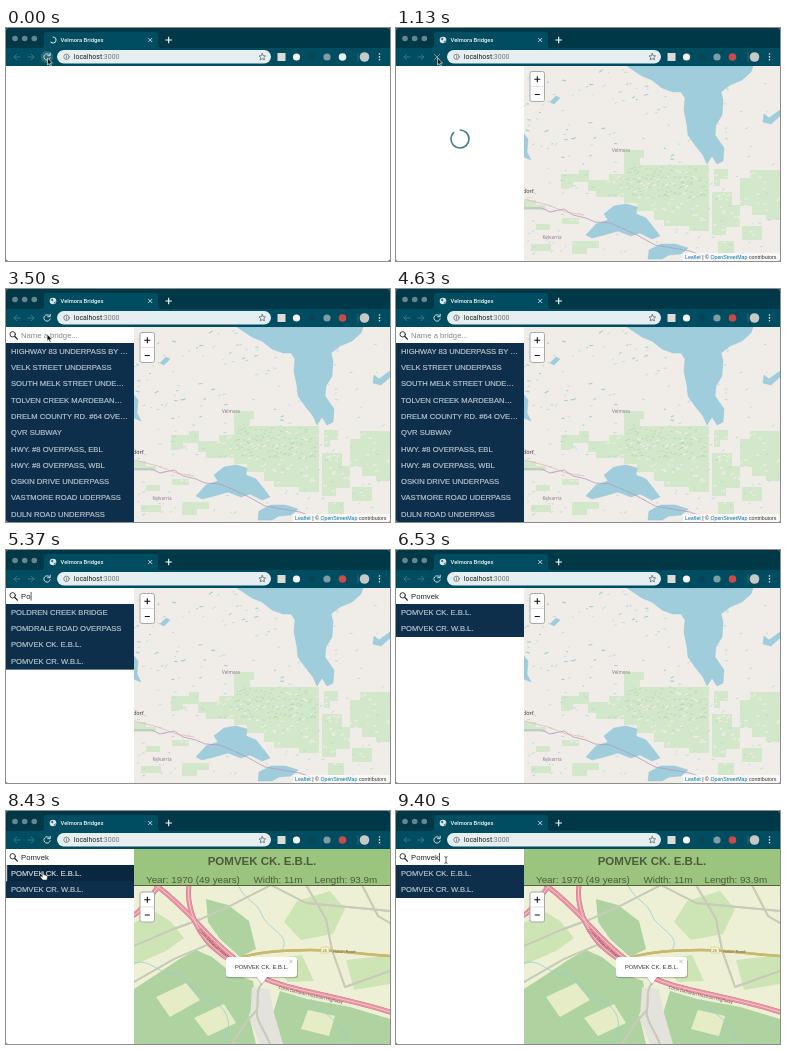
Recreate the animation shown at these times as an HTML page. Size 384 by 233 pixels, loop 9.43 s.

```html
<!DOCTYPE html>
<html lang="en">
<head>
<meta charset="utf-8">
<title>Bridge finder</title>
<style>
  html, body { margin: 0; width: 100%; height: 100%; overflow: hidden; background: #20282c; }
  svg { display: block; width: 100vw; height: 100vh; }
  text { font-family: "Liberation Sans", Arial, sans-serif; white-space: pre; }
  .ui { font-family: Roboto, sans-serif; }
  .map text { font-family: "Noto Sans", sans-serif; }
  .line { fill: none; stroke-linecap: round; stroke-linejoin: round; }
  .water { fill: #9fcddb; stroke: #8bbfd4; stroke-width: .4; }
  .woods { fill: #d3e7cb; }
</style>
</head>
<body>
<svg viewBox="0 0 384 233" preserveAspectRatio="none">
  <defs>
    <clipPath id="window"><rect width="384" height="233" rx="2.5"/></clipPath>
    <clipPath id="mapArea"><rect x="128" y="38" width="256" height="195"/></clipPath>
    <clipPath id="listArea"><rect y="54" width="128" height="179"/></clipPath>
  </defs>
  <g clip-path="url(#window)">
    <rect width="384" height="233" fill="#fff"/>

    <g id="app">
      <g clip-path="url(#mapArea)">
        <rect x="128" y="38" width="256" height="195" fill="#ddd"/>
        <g id="region" class="map">
          <rect x="128" y="38" width="256" height="195" fill="#f0ece7"/>
          <path class="woods" d="M228 122h20v8h-4v7h69v66h-20v-5h-25v-6h-10v-9h-17v-8h-13v-6h-28v-6h-8v-11h21v-6h15zM165 146h18v-4h10v12h-16v7h-12zM128 172h12v5h10v5h-22zM318 141h14v10h-8v7h-6zM344 150h10v-8h30v50h-14v-5h-14v-9h-12zM316 164h20v13h8v22h-14v8h-14zM346 198h20v14h-20zM140 196h14v6h-14zM166 190h17v6h-17zM135 216h20v7h-20zM176 213h27v7h-12v6h-15zM322 213h16v12h-16z"/>
          <path id="forest" class="line" stroke="#b3d5b0" stroke-width=".7"/>
          <path id="paleSpots" class="line" stroke="#f0ece7" stroke-width="1.300"/>
          <path class="water" d="M231 38L237 42L246 48L256 52L266 60L277 64L285 64L289 70L288 82L291 97L292 107L299 117L307 127L311 136L316 128L321 136L327 133L328 120L319 107L320 97L326 87L327 72L325 64L334 57L346 52L355 44L357 38Z"/>
          <path class="water" d="M190 207L200 196L212 192L208 186L218 178L230 176L241 179L240 186L250 190L258 200L264 208L256 211L244 205L235 208L222 203L208 207L196 210ZM253 222l12-6 14 0 13 4-7 6-12 1-7 4h-14zM154 74l6-6 4 2-6 6zM128 106l4 5-1 13 4 8-7-3zM368 86l5 4 11-8v6l-9 8-8-2z"/>
          <path id="lakes" class="line" stroke="#9fcddb" stroke-width="1.100"/>
          <path id="ponds" class="line" stroke="#a9d3df" stroke-width=".7"/>
          <path class="line" d="M128 180L146 180L154 184L168 181L177 187L190 190L199 194L214 195L228 201L241 207L259 217L294 223L320 233" stroke="#b49abf" stroke-width=".8"/>
          <path class="line" d="M128 171L152 177L170 184L188 187M128 160L140 166" stroke="#e3a8ad" stroke-width=".6"/>
          <g font-size="4.600" fill="#8b7b93" text-anchor="middle">
            <text x="225" y="123.500">Velmora</text>
            <text x="156" y="210.500">Kelvarria</text>
          </g>
          <text x="127" y="165" font-size="5.400" fill="#444">dorf</text>
        </g>
        <g id="town" class="map">
          <rect x="128" y="74" width="256" height="159" fill="#eef0d5"/>
          <path fill="#aed3a0" d="M128 178L151 163L172 149L190 139L206 146L226 162L247 170L250 190L243 204L250 233H128ZM200 88L222 94L243 110L250 138L234 146L214 128L202 111ZM274 180L301 188L344 196L384 208V233H274L264 212Z"/>
          <path fill="#cde5b5" d="M128 112L148 100L164 110L178 127L160 140L128 154ZM291 90l33-10 15 18-12 25-32 6-17-18ZM340 149l44-5v29l-36 6ZM262 148l34-4 12 26-26 1Z"/>
          <path fill="#e6edc6" d="M150 186l30-14 14 17-30 17ZM188 207l30-14 12 19-28 13ZM302 199l27 6-6 20-28-7Z"/>
          <path fill="#e4e2dc" d="M246 176l17 2 5 24 9 31h-23l-10-25Z"/>
          <path class="line" d="M232 74C240 91 251 90 256 104S286 124 276 139M128 152C144 147 150 162 167 163S186 185 204 190S228 215 217 233M305 188C312 202 334 205 342 233" stroke="#9bcbdc" stroke-width=".8"/>
          <path id="lanes" class="line" d="M256 172C249 181 253 190 251 199S258 218 264 233M251 199L240 211L226 233M128 135L165 119L195 108L222 96L265 74M300 74L320 108L326 139L339 176M128 171L168 148L201 134L225 150M384 160L339 176M356 74L372 105L384 112M265 74L300 92L384 100" stroke="#c9cbb9" stroke-width="1.900"/>
          <use href="#lanes" style="stroke:#fff;stroke-width:1.200"/>
          <path id="road" class="line" d="M236 146C254 141 281 139 305 139S355 143 384 145" stroke="#c9b96f" stroke-width="2.400"/>
          <use href="#road" style="stroke:#f5efac;stroke-width:1.700"/>
          <g class="line" id="highway">
            <path id="main" d="M150 74C168 88 180 100 194 115S232 153 256 166S330 184 384 201"/>
            <path d="M183 74C180 95 190 118 203 132S236 157 256 166"/>
            <path d="M128 104C137 99 143 87 152 76"/>
          </g>
          <rect x="315" y="136" width="8" height="6" rx="1" fill="#f8f5c9" stroke="#b6a963" stroke-width=".4"/>
          <g font-size="4" fill="#666">
            <text x="316.500" y="140.500">26</text>
            <text x="327" y="141.500">Helvin Road</text>
            <g font-size="4.200" fill="#744952">
              <text dy="4.500"><textPath href="#main" startOffset="62">Corin Dellavan Hostrom Highway</textPath></text>
              <text dy="4.500"><textPath href="#main" startOffset="160">Corin Dellavan Hostrom Highway</textPath></text>
            </g>
          </g>
        </g>
        <g id="popup">
          <path d="M223 147.500h66a3 3 0 0 1 3 3v13a3 3 0 0 1-3 3h-28l-5 7-5-7h-28a3 3 0 0 1-3-3v-13a3 3 0 0 1 3-3" fill="#0003" transform="translate(0 .8)"/>
          <path d="M223 146h65a3 3 0 0 1 3 3v14a3 3 0 0 1-3 3h-27l-5 7-5-7h-28a3 3 0 0 1-3-3v-14a3 3 0 0 1 3-3" fill="#fff"/>
          <text x="229" y="158" font-size="5.770" fill="#333">POMVEK CK. E.B.L.</text>
          <path class="line" d="m283.500 149 3 3m0-3-3 3" stroke="#bbb" stroke-width=".9"/>
        </g>
        <g id="zoom">
          <rect x="134" y="43.500" width="14.500" height="30" rx="2" fill="#fff" stroke="#aaa9a6"/>
          <path d="M134.500 58.500h13.500" stroke="#ccc" stroke-width=".6"/>
          <path d="M138.300 51.300h6M141.300 48.300v6M138.800 66.500h5" stroke="#111" stroke-width="1.100"/>
        </g>
        <g id="credit" font-size="5.250" fill="#333">
          <rect x="287" y="225" width="97" height="8" fill="#fff" opacity=".7"/>
          <text x="289" y="231"><tspan fill="#0078a8">Leaflet</tspan> | © <tspan fill="#0078a8">OpenStreetMap</tspan> contributors</text>
        </g>
        <g id="details" fill="#4c5b3a">
          <rect x="128" y="38" width="256" height="36.500" fill="#9bc47f"/>
          <path d="M128 74.500h256" stroke="#53633f"/>
          <text x="256" y="54.300" font-size="11.500" font-weight="bold" text-anchor="middle">POMVEK CK. E.B.L.</text>
          <g font-size="9.800"><text x="140" y="71.500">Year: 1970 (49 years)</text><text x="247.500" y="71.500">Width: 11m</text><text x="308.500" y="71.500">Length: 93.9m</text></g>
        </g>
      </g>
      <rect y="38" width="128" height="195" fill="#fff"/>
      <circle id="spinner" class="line" cx="64" cy="111" r="9" stroke="#4b7e8e" stroke-width="1.700" pathLength="360" stroke-dasharray="312 48"/>
      <g id="sidebar">
        <g clip-path="url(#listArea)" font-size="7.630">
          <rect id="listBack" y="54" width="128" fill="#0d2f4b"/>
          <rect id="hover" y="54" width="128" height="16.300" fill="#0a2740"/>
          <rect id="hoverEdge" y="54" width="1.200" height="16.300" fill="#c9d2d8"/>
          <g id="rows" stroke="#b9c5cc" stroke-width=".18"></g>
        </g>
        <g class="line" stroke="#222"><circle cx="6.700" cy="45.300" r="2.700" stroke-width=".9"/><path d="m8.800 47.500 2.600 2.700" stroke-width="1.200"/></g>
        <text id="query" x="15" y="48.500" font-size="7.700"></text>
        <rect id="caret" y="42" width=".7" height="8.500" fill="#111"/>
      </g>
    </g>

    <g id="chrome">
      <rect width="384" height="20.500" fill="#003848"/>
      <rect y="20" width="384" height="18" fill="#004d61"/>
      <path d="M35 20q3 0 3-3V7q0-3 3-3h108q3 0 3 3v10q0 3 3 3z" fill="#004d61"/>
      <g fill="#68858f"><circle cx="9" cy="10.500" r="2.800"/><circle cx="18.700" cy="10.500" r="2.800"/><circle cx="28.300" cy="10.500" r="2.800"/></g>
      <path id="tabSpinner" class="line" d="M47 9a3 3 0 1 1-2.100 5.100" stroke="#d7e5e9" stroke-width="1"/>
      <g id="globe"><circle cx="47" cy="12" r="3.300" fill="#dce8ec"/><path d="M44.500 11l2-1.500 1 1.500-1 1.500zm3 3 2-2v2l-1 .8z" fill="#3c7484"/></g>
      <text class="ui" x="54.500" y="14.100" font-size="5.800" font-weight="500" fill="#f0f6f8">Velmora Bridges</text>
      <path class="line" d="m142.500 10.300 3.400 3.400m0-3.400-3.400 3.400" stroke="#d2e0e4" stroke-width=".9"/>
      <path d="M159.500 12h6.400m-3.200-3.200v6.400" stroke="#fff" stroke-width="1.100"/>
      <g class="line" stroke="#3f7988" stroke-width=".9"><path d="M14 29H8m2.700-2.700L8 29l2.700 2.700M22 29h6m-2.700-2.700L28 29l-2.700 2.700"/></g>
      <circle id="reloadHover" cx="41" cy="29" r="6.200" fill="#24687a"/>
      <path id="reload" class="line" d="M43.400 26.700a3.200 3.200 0 1 0 .8 3.100M44.200 25.200v2.500h-2.500" stroke="#e2edf0" stroke-width=".9"/>
      <path id="stop" class="line" d="m38.500 26.500 5 5m0-5-5 5" stroke="#7fa3ae" stroke-width=".9"/>
      <rect x="51" y="22" width="214" height="13.500" rx="6.750" fill="#e5eef1"/>
      <g class="line" stroke="#56656a" stroke-width=".7"><circle cx="60.500" cy="28.800" r="2.700"/><path d="M60.500 28.500v1.700m0-3v.1"/></g>
      <text class="ui" x="67.800" y="31.200" font-size="6.950" fill="#222">localhost<tspan fill="#6d797d">:3000</tspan></text>
      <path class="line" d="m256.300 25.500 1 2.200 2.300.2-1.700 1.600.5 2.400-2.100-1.200-2.100 1.200.5-2.400-1.700-1.600 2.300-.2z" stroke="#4e5b60" stroke-width=".7"/>
      <rect x="271.500" y="25" width="8" height="8" fill="#dedbd7"/>
      <circle cx="290.500" cy="29" r="3.600" fill="#f5f5f5"/>
      <circle cx="306" cy="29" r="3.400" fill="#0a4353"/>
      <circle cx="321" cy="29" r="3.600" fill="#7f9ba4"/>
      <circle id="extension" cx="336.500" cy="29" r="3.800"/>
      <path d="M352 24.500v9" stroke="#3d7080" stroke-width=".7"/>
      <circle cx="358.500" cy="29" r="4.800" fill="#c7c9c4"/>
      <g fill="#e2edf0"><circle cx="373.500" cy="26" r=".8"/><circle cx="373.500" cy="28.900" r=".8"/><circle cx="373.500" cy="31.800" r=".8"/></g>
    </g>

    <g id="cursor">
      <path id="arrow" d="M0 0V7l1.600-1.500L2.700 8l1.200-.5-1.100-2.400H5z" fill="#111" stroke="#fff" stroke-width=".6"/>
      <path id="hand" d="M-.8 0q.8-1 1.600 0v2.800l3 .8q.8.300.6 1.300L4 8H-.2L-2.600 5q-.3-1 .8-.9l1 .8z" fill="#fff" stroke="#222" stroke-width=".5"/>
      <path id="beam" class="line" d="M-1.200-3.300q1.200 0 1.200.8q0-.8 1.200-.8M0-2.500v5M-1.200 3.300q1.200 0 1.200-.8q0 .8 1.200.8" stroke="#222" stroke-width=".7"/>
    </g>
  </g>
</svg>
<script>
const LOOP = 9430, ROW = 16.3, QUERY = 'Pomvek';
const CLICK = 7600, LIST_IN = 3000, PAGE_IN = 480, FOCUS = 4900;
const KEYS = [5080, 5260, 5430, 5590, 5760, 5940];
const BRIDGES = [
  'HIGHWAY 83 UNDERPASS BY …', 'VELK STREET UNDERPASS', 'SOUTH MELK STREET UNDE…',
  'TOLVEN CREEK MARDEBAN…', 'DRELM COUNTY RD. #64 OVE…', 'QVR SUBWAY',
  'HWY. #8 OVERPASS, EBL', 'HWY. #8 OVERPASS, WBL', 'OSKIN DRIVE UNDERPASS',
  'VASTMORE ROAD UDERPASS', 'DULN ROAD UNDERPASS', 'POLDREN CREEK BRIDGE',
  'POMDRALE ROAD OVERPASS', 'POMVEK CK. E.B.L.', 'POMVEK CR. W.B.L.'
];
// time, x, y, shape
const POINTER = [
  [0, 41.5, 30, 'arrow'], [1700, 41.5, 30, 'arrow'], [2350, 37.5, 42, 'arrow'],
  [3000, 37.5, 42, 'arrow'], [3700, 42, 46, 'beam'], [4300, 42, 46, ''],
  [6600, 48, 47, 'beam'], [6850, 46, 52, 'hand'], [7350, 37, 61, 'hand'],
  [8500, 37, 61, 'hand'], [8950, 46, 53, 'beam'], [9250, 50, 49, 'beam'], [LOOP, 50, 49, 'beam']
];

const $ = id => document.getElementById(id);
const show = (id, on) => { $(id).style.display = on ? '' : 'none'; };
const ramp = (t, from, to) => Math.min(1, Math.max(0, (t - from) / (to - from)));
const ease = p => p * p * (3 - 2 * p);

function random(seed) {
  return () => (seed = (seed * 16807) % 2147483647) / 2147483647;
}

// Short slanted strokes scattered over a rectangle
function scatter(id, seed, count, [x, y, w, h], length) {
  const next = random(seed);
  let d = '';
  for (let i = 0; i < count; i++) {
    const size = length * (.3 + next());
    d += `M${(x + next() * w).toFixed(1)} ${(y + next() * h).toFixed(1)}l${size.toFixed(1)} ${((next() - .7) * size).toFixed(1)}`;
  }
  $(id).setAttribute('d', d);
}

function drawHighway() {
  const layers = [['#cf7388', 5], ['#e892a2', 4.2], ['#f6d3d6', .8]];
  const lanes = [...$('highway').children];
  for (const [color, width] of layers) {
    for (const lane of lanes) {
      const copy = lane.cloneNode();
      copy.removeAttribute('id');
      copy.setAttribute('stroke', color);
      copy.setAttribute('stroke-width', width);
      $('highway').append(copy);
    }
  }
}

let listed = null;
function drawRows(query) {
  if (query === listed) return;
  listed = query;
  const matches = BRIDGES.filter(name => name.includes(query.toUpperCase()));
  $('rows').replaceChildren(...matches.map((name, i) => {
    const row = document.createElementNS('http://www.w3.org/2000/svg', 'text');
    row.setAttribute('x', 5);
    row.setAttribute('y', 64.7 + i * ROW);
    row.textContent = name;
    return row;
  }));
  $('listBack').setAttribute('height', matches.length * ROW + .4);
  $('query').textContent = query || 'Name a bridge...';
  $('query').setAttribute('fill', query ? '#222' : '#858585');
  $('caret').setAttribute('x', query ? 15.3 + $('query').getComputedTextLength() : 15);
}

function drawPointer(t) {
  const i = POINTER.findIndex((stop, n) => n + 1 === POINTER.length - 1 || t < POINTER[n + 1][0]);
  const [t0, x0, y0, shape] = POINTER[i], [t1, x1, y1] = POINTER[i + 1];
  const p = ease(ramp(t, t0, t1));
  $('cursor').setAttribute('transform', `translate(${x0 + (x1 - x0) * p} ${y0 + (y1 - y0) * p})`);
  for (const kind of ['arrow', 'hand', 'beam']) show(kind, kind === shape);
}

function draw(t) {
  const loading = t < PAGE_IN, picked = t >= CLICK;
  show('app', !loading);
  show('tabSpinner', loading);
  show('globe', !loading);
  $('tabSpinner').setAttribute('transform', `rotate(${t * .5} 47 12)`);
  $('extension').setAttribute('fill', loading ? '#e8eff1' : '#c94b48');

  const stopping = t > 150 && t < 1500;
  show('stop', stopping);
  show('reload', !stopping);
  show('reloadHover', t < 150);

  show('spinner', t < LIST_IN);
  $('spinner').setAttribute('transform', `rotate(${-88 + (t - 1130) / 700 * 360} 64 111)`);
  show('sidebar', t >= LIST_IN);
  drawRows(QUERY.slice(0, KEYS.filter(key => t >= key).length));
  show('caret', (t > FOCUS && t < 6480) || t > 9150);

  const hovering = t > 7000 && t < 8800;
  show('hover', hovering);
  show('hoverEdge', hovering);
  [...$('rows').children].forEach((row, i) =>
    row.setAttribute('fill', hovering && i === 0 ? '#e2e8eb' : '#b9c5cc'));

  show('region', !picked);
  $('region').style.opacity = ramp(t, 600, 850);
  show('credit', !picked);
  for (const id of ['town', 'popup', 'details']) show(id, picked);
  $('town').style.opacity = ramp(t, 7780, 8040);
  $('popup').style.opacity = ramp(t, 7740, 7940);
  $('zoom').setAttribute('transform', `translate(0 ${picked ? 37.5 : 0})`);
  drawPointer(t);
}

scatter('lakes', 41, 34, [128, 40, 150, 98], 2.6);
scatter('ponds', 97, 170, [128, 40, 256, 190], 2);
scatter('forest', 23, 110, [229, 139, 82, 30], 2);
scatter('paleSpots', 71, 190, [170, 139, 214, 80], 2.2);
drawHighway();

const start = performance.now();
function tick() {
  draw((performance.now() - start) % LOOP);
  requestAnimationFrame(tick);
}
tick();
</script>
</body>
</html>
```
